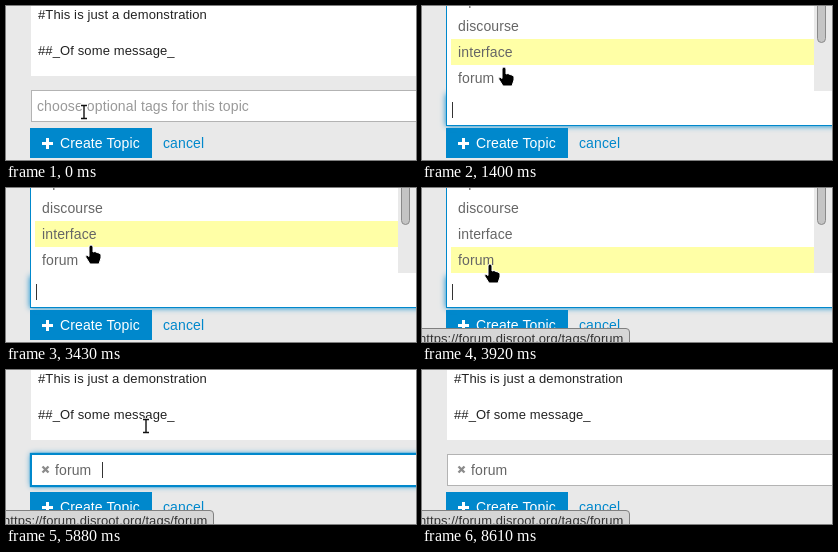
An HTML page that plays this animation: 410 by 154 pixels, repeating every 8.68 s.

```html
<!DOCTYPE html>
<html lang="en">
<head>
<meta charset="utf-8">
<title>Choosing a topic tag</title>
<style>
html, body { margin: 0; width: 100%; height: 100%; overflow: hidden; }
body { background: #e9e9e9; font: 14px/30px "Liberation Sans", Arial, sans-serif; letter-spacing: .12px; color: #666; }
#stage { position: relative; width: 410px; height: 154px; overflow: hidden; }
#stage div, #stage span, #stage svg { position: absolute; box-sizing: border-box; white-space: pre; }
svg { overflow: visible; }
[hidden] { display: none !important; }

#editor { left: 25px; top: 0; width: 385px; height: 70px; padding-left: 7px; background: #fff; color: #222; font-size: 13px; line-height: 18px; }
#button { left: 24px; top: 122px; width: 122px; height: 30px; padding-left: 30px; background: #08c; color: #fff; }
#cancel { left: 157px; top: 122px; color: #08c; }

#field { left: 25px; top: 84px; width: 400px; height: 32px; background: #fff; border: 1px solid #b3b3b3; }
#field.focus { border-color: #08c; box-shadow: 0 0 1px 1px #08c, 0 0 6px #08c; }
#field.open { left: 24px; top: 88px; }
#field.open.focus { box-shadow: 0 0 6px #08c; }
#hint { left: 5px; top: 0; color: #999; }
#tag { left: 23px; top: 0; }
#caret { width: 1px; height: 16px; background: #333; }

.drop { left: 24px; width: 400px; background: #fff; border-left: 1px solid #08c; }
#wait { top: 119px; height: 40px; }
#wait span { left: 4px; top: 4px; width: 396px; padding-left: 5px; background: #f4f4f4; line-height: 26px; }
#menu { top: 0; height: 90px; }
#list { left: 4px; top: 0; width: 381px; height: 85px; overflow: hidden; line-height: 26px; }
#list .row { left: 0; width: 363px; height: 26px; padding-left: 7px; }
#list .on { background: #ffffa6; }
#track { left: 363px; top: 0; width: 18px; height: 85px; background: #e9e9e9; }
#thumb { left: 3px; top: -40px; width: 9px; border: 1px solid #8a8a8a; border-radius: 5px; background: #c4c4c4; }

#status { left: -4px; top: 140px; width: 212px; height: 24px; border: 1px solid #808080; border-radius: 0 4px 0 0; background: #d6d6d6; color: #333; font-size: 13px; line-height: 19px; letter-spacing: .06px; }
</style>
</head>
<body>
<div id="stage">
  <div id="editor">#This is just a demonstration

##_Of some message_</div>
  <div id="button">Create Topic<svg style="left:12px;top:10px" width="11" height="11"><path d="M0 5.5H11M5.5 0V11" stroke="#fff" stroke-width="3"/></svg></div>
  <span id="cancel">cancel</span>
  <div id="field">
    <span id="hint">choose optional tags for this topic</span>
    <span id="tag">forum<svg style="left:-13px;top:11px" width="7" height="7"><path d="M.5 .5L6.5 6.5M6.5 .5L.5 6.5" stroke="#8c8c8c" stroke-width="2.4"/></svg></span>
  </div>
  <svg id="spinner" style="left:395px;top:104px" width="1" height="1"></svg>
  <div id="wait" class="drop"><span>Searching…</span></div>
  <div id="menu" class="drop">
    <div id="list"><div id="track"><div id="thumb"></div></div></div>
  </div>
  <div id="caret"></div>
  <div id="status">https://forum.disroot.org/tags/forum</div>
  <svg id="pointer" style="left:0;top:0" width="1" height="1">
    <g id="beam" fill="none">
      <path d="M-4 -6.5H4M-4 6.5H4M0 -6.5V6.5" stroke="#fff" stroke-width="3"/>
      <path d="M-3 -6.5H3M-3 6.5H3M0 -6.5V6.5" stroke="#111" stroke-width="1.4"/>
    </g>
    <path id="arrow" d="M0 0V16L4 12.5L6.5 18.5L9.5 17.3L7 11.5H12Z" stroke="#fff"/>
    <path id="hand" d="M-2 2Q-2 0 0 0T2 2V7L4 6.5L6 7.5L8 8L10 9.5V13L8 19H-1L-5 12.5Q-6 10 -4 10L-2 11.5Z" stroke="#fff"/>
  </svg>
</div>
<script>
const LOOP = 8680, STEP = 70;
const $ = id => document.getElementById(id);
const within = (t, a, b) => t >= a && t < b;
const show = (id, on) => $(id).toggleAttribute('hidden', !on);

// Pointer hot spot: time, x, y
const path = [
  [0, 78, 106], [280, 78, 106], [350, 76, 103], [1050, 76, 103], [1260, 78, 80], [1470, 84, 51],
  [1540, 84, 51], [1750, 90, 43], [1820, 90, 43], [2310, 97, 29], [2450, 96, 27], [2520, 96, 27],
  [2870, 91, 43], [3150, 86, 55], [3430, 85, 57], [3640, 68, 76], [4200, 68, 76], [4550, 68, 69],
  [5250, 68, 69], [5320, 68, 71], [5600, 68, 71], [5740, 95, 67], [5880, 140, 56],
  [6020, 176, 28], [6160, 200, -20], [LOOP, 200, -20]
];
// Highlighted row from each time on
const picks = [[0, -1], [1260, 3], [1400, 2], [2380, 1], [2730, 2], [3500, 3]];

const rows = ['cipa', 'discourse', 'interface', 'forum'].map(name => {
  const row = document.createElement('div');
  row.className = 'row';
  row.textContent = name;
  $('list').append(row);
  return row;
});

$('spinner').innerHTML = Array.from({ length: 8 }, (_, i) =>
  `<path d="M0 -3.5V-7" stroke="#555" stroke-width="2" opacity="${(i + 1) / 8}" transform="rotate(${i * 45})"/>`).join('');

function position(t) {
  const i = Math.max(1, path.findIndex(p => p[0] >= t));
  const [t0, x0, y0] = path[i - 1], [t1, x1, y1] = path[i];
  const k = (t - t0) / (t1 - t0);
  return [x0 + (x1 - x0) * k, y0 + (y1 - y0) * k].map(Math.round);
}

function draw(t) {
  const open = within(t, 350, 5320);
  $('field').className = (open ? 'open ' : '') +
    (within(t, 350, 5180) || within(t, 5320, 8610) ? 'focus' : '');
  show('hint', t < 350);
  show('tag', t >= 5320);

  const loading = within(t, 350, 910);
  show('wait', loading);
  show('spinner', loading);
  const turn = [490, 560, 700].filter(s => t >= s).length * 45;
  $('spinner').style.transform = `rotate(${turn}deg)`;

  show('menu', within(t, 910, 5320));
  const scrolled = t >= 1260;
  const pick = picks.filter(p => t >= p[0]).pop()[1];
  rows.forEach((row, i) => {
    row.style.top = i * 26 - (scrolled ? 19 : 9) + 'px';
    row.classList.toggle('on', i === pick);
  });
  $('thumb').style.height = (scrolled ? 77 : 68) + 'px';

  show('caret', within(t, 350, 1610) || within(t, 2870, 4130) ||
    within(t, 5390, 6650) || within(t, 7910, 8610));
  $('caret').style.left = (open ? 30 : 96) + 'px';
  $('caret').style.top = (open ? 96 : 92) + 'px';

  $('status').style.opacity = Math.min(1, Math.max(0, (t - 3710) / 210));

  const kind = t < 350 || t >= 5740 ? 'beam' : within(t, 1260, 5320) ? 'hand' : 'arrow';
  for (const id of ['beam', 'arrow', 'hand']) $(id).style.display = id === kind ? '' : 'none';
  const [x, y] = position(t);
  $('pointer').style.transform = `translate(${x}px, ${y}px)`;
}

const start = performance.now();
function tick() {
  const t = (performance.now() - start) % LOOP;
  draw(Math.floor(t / STEP) * STEP);
  requestAnimationFrame(tick);
}
tick();
</script>
</body>
</html>
```
